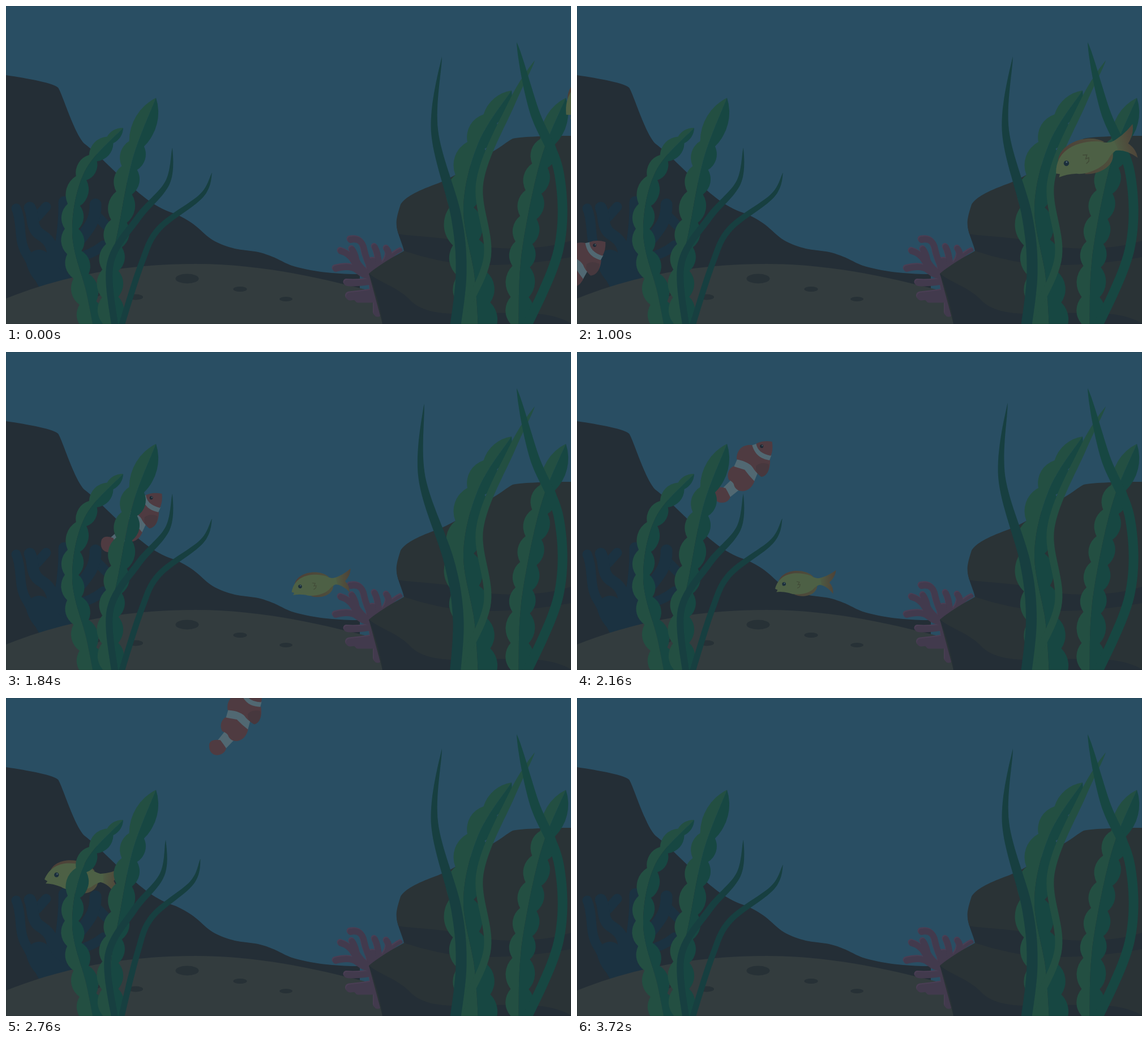
These frames come from a looping animation (998x561 px, 4000 ms). An HTML page:

```html
<!DOCTYPE html>
<html lang="en">
<head>
<meta charset="utf-8">
<title>Reef</title>
<style>
html, body { margin: 0; width: 100%; height: 100%; overflow: hidden; background: #294e63; }
svg { display: block; width: 100%; height: 100%; }
.limb { fill: none; stroke-linecap: round; stroke-linejoin: round; }
</style>
</head>
<body>
<svg viewBox="0 0 998 561" preserveAspectRatio="none">
  <defs>
    <linearGradient id="tail" gradientUnits="userSpaceOnUse" x1="38" y1="0" x2="74" y2="4">
      <stop offset="0" stop-color="#4d6045"/><stop offset=".7" stop-color="#4f4a3b"/><stop offset="1" stop-color="#4c4339"/>
    </linearGradient>
    <linearGradient id="fin" gradientUnits="userSpaceOnUse" x1="-45" y1="0" x2="40" y2="0">
      <stop offset="0" stop-color="#4d3e37"/><stop offset="1" stop-color="#4e513d"/>
    </linearGradient>
    <g id="pinkArms" class="limb">
      <path stroke-width="24" d="M648 456Q650 475 658 515"/>
      <path stroke-width="11" d="M608 412Q628 408 632 428T648 470M611 429Q616 436 618 446T640 474M591 432Q606 436 614 450T640 474M582 463Q608 456 620 466T645 476M651 425Q657 435 658 455M672 428Q682 440 664 460M602 488Q625 490 650 484"/>
      <path stroke-width="14" d="M607 512Q630 510 652 506M622 516H645M656 515V541"/>
      <path stroke-width="6" d="M697 430Q684 436 672 450"/>
    </g>
  </defs>
  <rect width="998" height="561" fill="#294e63"/>
  <path fill="#242e36" d="M0 122C40 128 84 136 92 144C99 153 122 230 140 244C165 263 195 297 228 324C250 343 270 358 300 367C346 388 346 405 375 418C405 432 425 430 445 434C475 441 490 453 505 458C545 470 590 473 625 473V561H0Z"/>
  <g class="limb" stroke="#1b3241">
    <path stroke-width="17" d="M18 357C30 385 20 415 38 440T70 500M71 354L55 372M162 372L178 388M120 445Q150 440 172 422"/>
    <path stroke-width="21" d="M42 356C50 370 42 392 62 404S84 430 84 460M103 346Q104 385 94 440M158 350C160 400 115 410 96 470"/>
    <path stroke-width="44" d="M58 452Q66 476 96 488"/>
  </g>
  <path fill="#333c3e" d="M0 516C100 476 210 455 335 455C460 455 570 484 650 504L690 561H0Z"/>
  <g fill="#273136">
    <ellipse cx="320" cy="481" rx="20.5" ry="8.5"/>
    <ellipse cx="413.500" cy="499.500" rx="12" ry="4.500"/>
    <ellipse cx="494.500" cy="517" rx="11.500" ry="4"/>
    <ellipse cx="229" cy="513.500" rx="13" ry="5"/>
    <ellipse cx="155" cy="509" rx="12" ry="4"/>
  </g>
  <use href="#pinkArms" stroke="#4a3e54" transform="translate(-1 -1.500)"/>
  <use href="#pinkArms" stroke="#423a4d" transform="translate(.5 .5)"/>
  <path fill="#242e36" d="M690 388L998 380V470H720L703 432C700 418 692 404 690 388Z"/>
  <path fill="#2a3336" d="M998 229C950 229 905 231 895 234C883 240 870 253 851 261C830 272 800 300 757 315C725 327 705 337 697 350C688 378 688 384 693 402C725 408 780 406 820 421C870 431 950 431 998 414Z"/>
  <path fill="#2a3336" d="M641 472C660 456 685 442 703 432C740 444 790 457 840 457C900 458 960 450 998 443V561H665Z"/>
  <path fill="#242e36" d="M641 472C660 488 690 495 712 517C735 542 770 542 810 544C840 541 900 541 940 543C965 545 985 552 998 560V561H665C663 540 652 500 641 472Z"/>
  <g id="right"></g>
  <g id="clown">
    <path fill="#516872" d="M-34 31L-18 14L-4 32L-22 48Z"/>
    <path fill="#4f3b41" d="M-50 37Q-46 28 -30 32Q-26 38 -21 47C-24 62 -55 64 -50 37Z"/>
    <path fill="#4f3b41" d="M-16 -8C-26 -5 -30 8 -25 17Q-18 20 -16 24C-12 42 16 40 21 14L2 -4Z"/>
    <path fill="#516872" d="M-12 -20L12 -18L25 3L20 17Q10 8 2 -2L-17 -7Z"/>
    <path fill="#4f3b41" d="M-13 -20C-14 -38 -2 -48 15 -46L46 -21C47 -8 44 6 32 8Q24 4 18 -4Q12 -16 -13 -20Z"/>
    <path fill="#47383e" d="M22 -10Q30 -18 44 -14C46 -4 42 7 32 9Q20 2 22 -10Z"/>
    <path fill="#516872" d="M13 -46L21 -49L28 -36L48 -30L45 -21C30 -23 20 -28 13 -46Z"/>
    <path fill="#4f3b41" d="M20 -49Q32 -56 48 -54Q51 -40 47 -29Q24 -32 20 -49Z"/>
    <circle cx="30" cy="-45" r="3" fill="#1b2733"/><circle cx="31" cy="-46" r="1" fill="#516872"/>
  </g>
  <g id="yellow">
    <path fill="url(#fin)" d="M-45 -9C-38 -34 10 -36 30 -12ZM-15 21C4 31 34 28 36 5Z"/>
    <path fill="url(#tail)" d="M36 -7Q58 -8 79 -20Q76 -6 62 4Q70 16 67 29Q54 8 37 6Z"/>
    <path fill="#4d6045" d="M-54 4C-40 -32 0 -27 24 -15Q34 -7 44 -7L45 6Q34 7 25 15C10 24 -14 23 -26 16Q-40 11 -52 11L-49 7Z"/>
    <circle cx="-34" cy="-4" r="4" fill="#1b2e3b"/><circle cx="-33" cy="-5.500" r="1.200" fill="#516872"/>
    <path fill="none" stroke="#414a37" stroke-width="1.200" d="M-7 -6L-1 -4L-5 1H0L-2 6L-7 8"/>
  </g>
  <g id="left"></g>
  <rect x=".5" y=".5" width="997" height="560" fill="none" stroke="#000" stroke-opacity=".1"/>
</svg>
<script>
const LIGHT = '#234f42', DARK = '#174742', DEEP = '#173f40';
const LOOP = 4000, STEP = 40;
const byId = id => document.getElementById(id);
const pts = s => s.split(' ').map(p => p.split(',').map(Number));
const line = p => p.map(q => q[0].toFixed(1) + ' ' + q[1].toFixed(1)).join('L');

function addPath(parent, fill, d = '') {
  const el = document.createElementNS('http://www.w3.org/2000/svg', 'path');
  el.setAttribute('fill', fill);
  el.setAttribute('d', d);
  byId(parent).appendChild(el);
  return el;
}

// Catmull-Rom curve through p, each sample with its unit normal
function smooth(p, n = 16) {
  const out = [];
  for (let i = 0; i < p.length - 1; i++) {
    const a = p[i - 1] || p[i], b = p[i], c = p[i + 1], d = p[i + 2] || c;
    for (let j = 0; j < n; j++) {
      const t = j / n;
      out.push([0, 1].map(k => b[k] + t / 2 * (c[k] - a[k]
        + t * (2 * a[k] - 5 * b[k] + 4 * c[k] - d[k] + t * (3 * (b[k] - c[k]) + d[k] - a[k])))));
    }
  }
  out.push(p[p.length - 1]);
  return out.map(([x, y], i) => {
    const q = out[Math.max(0, i - 1)], r = out[Math.min(out.length - 1, i + 1)];
    const len = Math.hypot(r[0] - q[0], r[1] - q[1]);
    return [x, y, (r[1] - q[1]) / len, (q[0] - r[0]) / len];
  });
}

// Scalloped leaf: a plain head, then a notch every pitch along the rib.
// slim is the share of the full width left at the tip.
function leaf(parent, spine, { head, pitch, left, right, slim }) {
  const rib = smooth(pts(spine));
  [[-left, 0, LIGHT], [right, 1, DARK]].forEach(([width, sweep, fill]) => {
    let from = rib[0], d = 'M' + line([from]), run = 0, next = head;
    rib.forEach(([x, y, nx, ny], i) => {
      if (i) run += Math.hypot(x - rib[i - 1][0], y - rib[i - 1][1]);
      if (run < next) return;
      const w = width * (slim + (1 - slim) * i / rib.length);
      const to = [x + nx * w, y + ny * w];
      const r = Math.hypot(to[0] - from[0], to[1] - from[1]) * (next === head ? .95 : .75);
      d += `A${r} ${r} 0 0 ${sweep} ${line([to])}`;
      from = to;
      next += pitch;
    });
    addPath(parent, fill, d + 'L' + line(rib.slice().reverse()) + 'Z');
  });
}

// Tapered blade; the returned function pushes its tip sideways
function blade(parent, fill, width, spine, taper = .5, lift = 0) {
  const el = addPath(parent, fill), base = pts(spine), top = base[0][1];
  const bend = dx => {
    const mid = smooth(base.map(([x, y]) => {
      const w = Math.max(0, (545 - y) / (545 - top));
      return [x + dx * w, y + dx * lift * w];
    }));
    const side = sign => mid.map(([x, y, nx, ny], i) => {
      const u = Math.min(1, i / mid.length / taper);
      const h = sign * width / 2 * (1 - (1 - u) ** 2);
      return [x + nx * h, y + ny * h];
    });
    el.setAttribute('d', 'M' + line(side(1).concat(side(-1).reverse())) + 'Z');
  };
  bend(0);
  return bend;
}

leaf('right', '893,149 835,240 808,355 828,480 836,610', { head: 58, pitch: 56, left: 36, right: 27, slim: .35 });
blade('right', LIGHT, 13, '934,96 893,172 837,310 849,450 780,585', .35);
const bendRight = blade('right', DEEP, 19, '770,89 757,220 795,370 804,470 793,570', .6, -.06);
leaf('right', '989,162 948,260 920,380 907,480 906,610', { head: 80, pitch: 46, left: 15, right: 18, slim: .8 });
blade('right', DARK, 17, '902,64 933,185 977,295 976,430 915,575', .3);

leaf('left', '207,215 139,292 117,400 143,510 162,610', { head: 28, pitch: 44, left: 19, right: 16, slim: .4 });
leaf('left', '265,162 225,265 201,380 185,480 192,610', { head: 84, pitch: 46, left: 16, right: 13, slim: .95 });
const bendNear = blade('left', DEEP, 12, '294,250 285,312 233,374 184,455 193,570');
const bendFar = blade('left', DEEP, 10.5, '364,294 345,335 270,393 239,455 202,570', .5, .5);

const clamp = u => Math.min(1, Math.max(0, u));
const ease = u => .5 - Math.cos(Math.PI * clamp(u)) / 2;
const sway = (t, start, peak, end) =>
  ease(t < peak ? (t - start) / (peak - start) : (end - t) / (end - peak));
const bezier = (u, a, b, c, d) =>
  a * (1 - u) ** 3 + 3 * b * u * (1 - u) ** 2 + 3 * c * u * u * (1 - u) + d * u ** 3;

function place(id, x, y, angle, scale) {
  byId(id).setAttribute('transform', `translate(${x} ${y}) rotate(${angle}) scale(${scale})`);
}

// Swims right to left through a dip, shrinking at its far point
function swimYellow(t) {
  const u = clamp((t - 160) / 3560), dip = Math.sin(Math.PI * (u - .006)) ** 2;
  place('yellow', bezier(u, 1058, 1061, -40, -122), 150 + 250 * dip + 30 * u,
    -27 + 34 * ease(u), 1.48 - .61 * dip - .1 * u);
}

// Rises from the lower left and leaves over the top
function swimClown(t) {
  const u = clamp((t - 720) / 2680);
  place('clown', bezier(u, -95, 199, 395, 493), bezier(u, 474, 478, 31, -94), 10 - 25 * u * u, 1);
}

function draw(t) {
  swimYellow(t);
  swimClown(t);
  bendRight(-34 * sway(t, 960, 1720, 2400));
  bendFar(-24 * sway(t, 2080, 2640, 3120));
  bendNear(-12 * sway(t, 2240, 2740, 3120));
}

const began = performance.now();
function tick() {
  const t = (performance.now() - began) % LOOP;
  draw(Math.floor(t / STEP) * STEP);
  requestAnimationFrame(tick);
}
tick();
</script>
</body>
</html>
```
